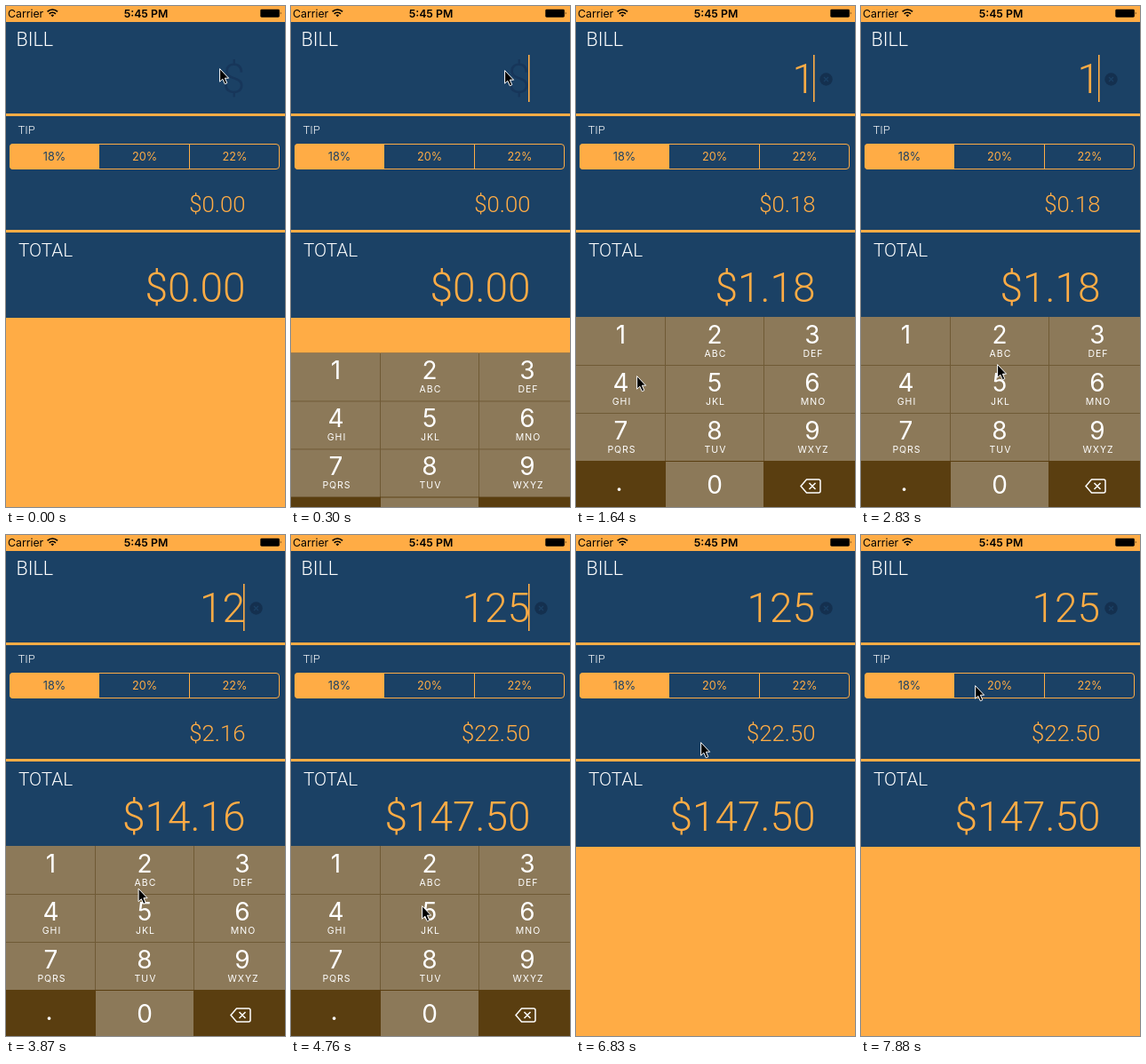
Animation of 314x564 px, one loop 8 s. Source, as an HTML page:

```html
<!DOCTYPE html>
<html lang="en">
<head>
<meta charset="utf-8">
<title>Tip calculator</title>
<style>
  html, body { margin: 0; width: 100%; height: 100%; overflow: hidden; background: #ffac45; }
  svg { display: block; width: 314px; height: 564px; }
  text { font-family: Inter, sans-serif; }
  .light { font-family: Roboto, sans-serif; font-weight: 300; }
  .title { font-size: 21px; fill: #fff; }
  .amount { font-size: 46px; fill: #ffac45; text-anchor: end; }
  .status { font-size: 12.3px; }
  .segment { font-size: 12.7px; fill: #ffac45; text-anchor: middle; }
  .digit { font-size: 28px; font-weight: 400; fill: #fff; text-anchor: middle; }
  .letters { font-size: 10.5px; letter-spacing: 1px; fill: #fff; text-anchor: middle; }
</style>
</head>
<body>
<svg viewBox="0 0 314 564">
  <rect width="314" height="564" fill="#ffac45"/>

  <g class="status">
    <text x="2" y="12.5">Carrier</text>
    <text x="157.5" y="12.5" font-weight="600" text-anchor="middle">5:45 PM</text>
    <g fill="none" stroke="#000" stroke-width="1.7">
      <path d="M46.6 6.4a8 8 0 0 1 11.4 0M48.7 8.8a5 5 0 0 1 7.2 0"/>
      <path d="M52.3 12.2l-1.8-1.8a2.6 2.6 0 0 1 3.6 0z" fill="#000" stroke="none"/>
    </g>
    <rect x="286.3" y="3.7" width="21.5" height="9" rx="1.4"/>
    <path d="M308.8 6.6q1.6 1.6 0 3.2z"/>
  </g>

  <g fill="#1b4165">
    <rect y="18" width="314" height="103"/>
    <rect y="124" width="314" height="128"/>
    <rect y="255" width="314" height="96"/>
  </g>

  <text class="light title" x="11.5" y="45" style="font-size:21.5px">BILL</text>
  <text class="light title" x="14" y="282" style="font-size:20.7px">TOTAL</text>
  <text class="light title" x="13.5" y="144" style="font-size:13px">TIP</text>

  <path d="M105 155H8a4 4 0 0 0-4 4v21a4 4 0 0 0 4 4h97z" fill="#ffac45"/>
  <rect x="4.5" y="155.5" width="303" height="28" rx="3.5" fill="none" stroke="#ffac45"/>
  <path d="M206.5 155v29" stroke="#ffac45"/>
  <text class="segment" x="54.5" y="174" style="fill:#1b4165">18%</text>
  <text class="segment" x="156" y="174">20%</text>
  <text class="segment" x="257.5" y="174">22%</text>

  <text id="bill" class="light amount" x="269" y="98"></text>
  <text id="tip" class="light amount" x="269.5" y="232" style="font-size:25.7px"></text>
  <text id="total" class="light amount" x="269.5" y="333"></text>
  <g id="clear">
    <circle cx="281.5" cy="82.5" r="7.2" fill="#14304f"/>
    <path d="M279 80l5 5m0-5l-5 5" stroke="#1b4165" stroke-width="1.2"/>
  </g>
  <rect id="caret" x="267" y="55" width="1.6" height="53" fill="#ffac45"/>

  <g id="keyboard"></g>
  <path id="pointer" d="M.6 .6V15.2l3.2-3 2.5 5.6 2.5-1.1-2.4-5.5H10.6z" stroke="#fff" stroke-linejoin="round"/>
</svg>

<script>
const LOOP = 8000;
const STEP = 148.6;
const TIP_RATE = 0.18;
const KEY = '#8c7959', DARK_KEY = '#5a3e10', DIVIDER = '#6f5a35';

// Step at which each key goes down; its digit appears one step later.
const presses = [
  { key: '1', at: 9 },
  { key: '2', at: 25 },
  { key: '5', at: 27 },
];

// Pointer tip: [step, x, y]
const route = [
  [0, 240, 70], [2, 240, 72], [6, 84, 390], [8, 56, 378], [10, 55, 378],
  [14, 107, 530], [15, 116, 528], [19, 153, 403], [22, 150, 378], [25, 150, 378],
  [27, 147, 417], [35, 147, 417], [39, 147, 245], [41, 140, 233], [49, 140, 233],
  [51, 63, 194], [52, 92, 170], [53, 128, 169],
];

const $ = id => document.getElementById(id);
const keyRects = {};

function buildKeyboard() {
  const columns = [[0, 100, 50.5], [101, 110, 156], [212, 102, 266]];
  const letters = ['', 'ABC', 'DEF', 'GHI', 'JKL', 'MNO', 'PQRS', 'TUV', 'WXYZ', '', '', ''];
  let markup = `<rect y="350" width="314" height="163" fill="${DIVIDER}"/>
    <rect y="512" width="314" height="52" fill="${DARK_KEY}"/>`;
  [...'123456789.0<'].forEach((key, i) => {
    const [x, width, center] = columns[i % 3];
    const row = Math.floor(i / 3), y = 350 + row * 54;
    const top = row ? y + 1 : y;
    if (!'.<'.includes(key))
      markup += `<rect data-key="${i}" x="${x}" y="${top}" width="${width}" height="${y + 54 - top}" fill="${KEY}"/>`;
    if (key !== '<') {
      const dx = key === '.' ? -2 : 0;
      const baseline = row === 3 ? 549 - (key === '.' ? 3 : 0) : y + 30;
      markup += `<text class="digit" x="${center + dx}" y="${baseline}">${key}</text>`;
    }
    markup += `<text class="letters" x="${center + 1}" y="${y + 45}">${letters[i]}</text>`;
  });
  markup += `<path d="M253 540.5l6.5-7.5h13.5q2 0 2 2v11q0 2-2 2h-13.5z
    M262.5 537l7 7m0-7l-7 7" fill="none" stroke="#fff" stroke-width="1.5" stroke-linejoin="round"/>`;
  $('keyboard').innerHTML = markup;
  for (const { key } of presses)
    keyRects[key] = document.querySelector(`[data-key="${key - 1}"]`);
}

const clamp = v => Math.min(1, Math.max(0, v));
const easeOut = v => 1 - (1 - clamp(v)) ** 2;
const money = v => '$' + v.toFixed(2);
const show = (id, visible) => $(id).setAttribute('visibility', visible ? 'visible' : 'hidden');

function pointerAt(step) {
  const next = Math.max(1, route.findIndex(([at]) => at >= step));
  const [s0, x0, y0] = route[next - 1], [s1, x1, y1] = route[next];
  const k = clamp((step - s0) / (s1 - s0));
  return [x0 + (x1 - x0) * k, y0 + (y1 - y0) * k];
}

function caretVisible(step) {
  if (step < 2 || step > 43) return false;
  const phase = (step < 11 ? step + 3 : step) % 7;
  return phase < 1 || phase > 3;
}

function render(step) {
  const typed = presses.filter(p => step > p.at).map(p => p.key).join('');
  const tip = typed * TIP_RATE;
  $('bill').textContent = typed || '$';
  $('bill').style.fill = typed ? '' : '#17365a';
  $('tip').textContent = money(tip);
  $('total').textContent = money(+typed + tip);
  show('clear', typed);
  show('caret', caretVisible(step));

  for (const { key, at } of presses)
    keyRects[key].setAttribute('fill', step === at ? DARK_KEY : KEY);

  const raised = easeOut((step - 0.7) / 2.3) - easeOut((step - 43.3) / 2.5);
  $('keyboard').setAttribute('transform', `translate(0 ${214 * (1 - raised)})`);
  $('pointer').setAttribute('transform', `translate(${pointerAt(step)})`);
}

function tick() {
  render(Math.floor((performance.now() % LOOP + 10) / STEP));
  requestAnimationFrame(tick);
}

buildKeyboard();
tick();
</script>
</body>
</html>
```
